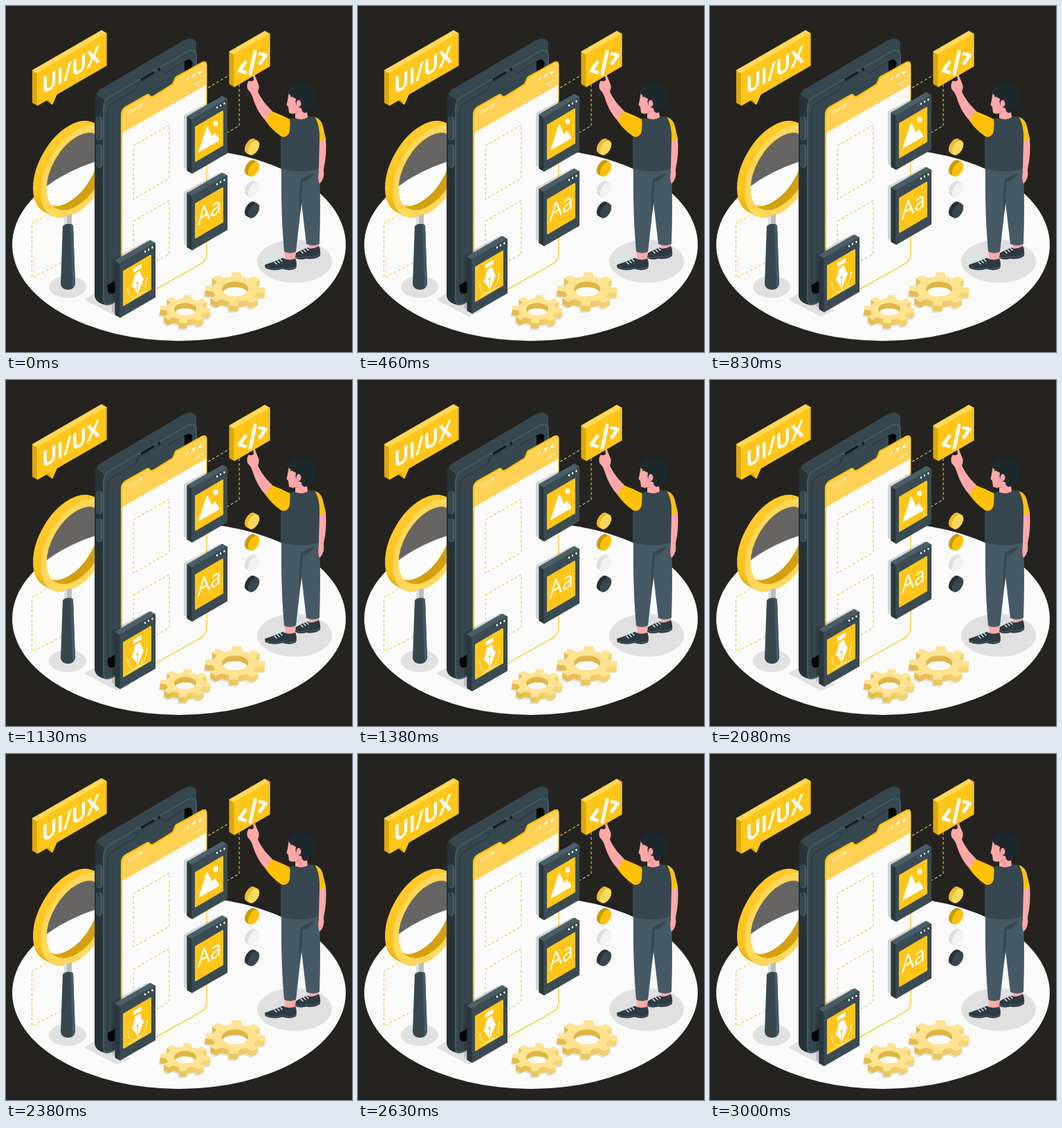
Animation of 500 by 500 pixels, one loop 3040 ms. Source, as an HTML page:

```html
<!DOCTYPE html>
<html lang="en">
<head>
<meta charset="utf-8">
<title>UI/UX design</title>
<style>
html, body { margin: 0; width: 100%; height: 100%; overflow: hidden; background: #24231f; }
svg { display: block; width: 100%; height: 100%; }
text { font-family: "Open Sans", "Noto Sans", sans-serif; fill: #fff; }
.dash { fill: none; stroke: #f3c64f; stroke-width: 1.1; stroke-dasharray: 4 3; }
.white { fill: none; stroke: #fff; stroke-linecap: round; stroke-linejoin: round; }
</style>
</head>
<body>
<svg id="stage" viewBox="0 0 500 500"></svg>
<script>
const SLOPE = 0.577, LOOP = 3040, LIFT = 10;
const YELLOW = ['#ffc619', '#dda70a', '#ffd754'];
const SLATE = ['#3b4b53', '#2a373d', '#4b5f69'];

const path = (d, fill, extra = '') => `<path d="${d}" fill="${fill}" ${extra}/>`;
const poly = (points, fill, extra = '') => `<polygon points="${points}" fill="${fill}" ${extra}/>`;
const ellipse = (x, y, rx, ry, fill, extra = '') =>
  `<ellipse cx="${x}" cy="${y}" rx="${rx}" ry="${ry}" fill="${fill}" ${extra}/>`;
const face = (x, y) => `transform="matrix(.866 -.5 0 1 ${x} ${y})"`;
const isoCircle = (x, y, r, fill, extra = '') => `<circle r="${r}" fill="${fill}" ${extra} ${face(x, y)}/>`;
const label = (x, y, size, weight, text) =>
  `<text font-size="${size}" font-weight="${weight}" ${face(x, y)}>${text}</text>`;

// Upright isometric slab; x, y is the top left corner of its front
function slab(x, y, w, h, [front, side, top]) {
  const rise = w * SLOPE, r = x + w;
  const part = (points, c) => poly(points, c, `stroke="${c}" stroke-width="1.2" stroke-linejoin="round"`);
  return part([x - 7, y - 4, x, y, x, y + h, x - 7, y + h - 4], side) +
    part([x - 7, y - 4, r - 7, y - 4 - rise, r, y - rise, x, y], top) +
    part([x, y, r, y - rise, r, y - rise + h, x, y + h], front);
}

function card(id, dx, dy, icon) {
  const dots = [[305, 147], [310, 144], [315.5, 141]].map(p => ellipse(...p, 1.2, 1.6, '#fff')).join('');
  return `<g id="${id}"><g transform="translate(${dx} ${dy})">` +
    poly('257,158 309,130 320,138 320,206 268,240 257,234', '#000', 'opacity=".15"') +
    slab(269, 164, 50.5, 78, SLATE) + dots +
    poly('274,175.5 313,152.5 313,201.5 274,224.5', '#ffc619', 'stroke="#ffc619" stroke-width="2" stroke-linejoin="round"') +
    `</g>${icon}</g>`;
}

function magnifier() {
  let rim = '';
  for (let d = 11; d >= 0; d--) {
    const color = d ? 'url(#rim)' : '#ffd75a';
    rim += isoCircle(102 - d, 239 - d * 0.55, 55, 'none', `stroke="${color}" stroke-width="10"`);
  }
  return ellipse(89, 406, 27, 16, '#e0e0e0') +
    isoCircle(99, 237, 51, '#fff', 'opacity=".3"') + rim +
    path('M84 304L95 301V318H84Z', '#bdbdbd') + path('M84 304L88 303V318H84Z', '#e0e0e0') +
    path('M82 318Q89 312 97 317L100 402Q97 411 89 410Q80 409 79 402Z', '#37474f') +
    path('M93 315Q96 315 97 317L100 402Q99 406 96 408Z', '#455a64');
}

function phone() {
  const frame = 'M141 148Q141 136 150 131L262 66Q274 60 275 71V360L152 430Q141 435 141 424Z';
  const screen = 'M147 153Q147 145 153 141L181 125L186 122Q189 120 189 116Q190 112 194 110L222 94Q226 92 227 95Q228 99 232 96L260 79Q269 75 269 84V350L157 414Q147 419 147 408Z';
  const button = y => `<rect x="130" y="${y}" width="9.5" height="34" rx="4.5" fill="#455a64"/>
    <rect x="130" y="${y}" width="6.5" height="33" rx="3.2" fill="#37474f"/>`;
  return path('M113 424L129 415L180 440L160 449Z', '#e0e0e0') +
    path('M128 137Q128 126 137 120L256 50Q268 43 275 52V368L152 431Q143 434 134 428Q128 424 128 416Z', '#37474f') +
    path('M128 137Q128 131 131 127L143 137Q141 141 141 148V431Q137 430 134 428Q128 424 128 416Z', '#263238') +
    path(frame, '#37474f', 'stroke="#455a64" stroke-width="2"') +
    path(screen, '#37474f', 'stroke="#263238" stroke-width="1"') +
    path('M147 403L161 395V412L157 414Q147 419 147 408Z', '#050606') +
    path('M258 80L260 79Q269 75 269 84V105H258Z', '#050606') +
    path('M196 106L213 96', 'none', 'stroke="#11181b" stroke-width="3" stroke-linecap="round"') +
    ellipse(221, 91.5, 1.8, 2.2, '#11181b') + button(160) + button(200);
}

function panel() {
  const edge = 'M167 157Q167 150 173 146L203 129Q206 127 207 129L209 131Q211 132 214 130L238 115Q242 113 243 109L244 106Q245 102 249 101L283 82';
  const top = edge + 'Q290 78 290 87';
  const frame = (y, h) => `<path class="dash" d="M184 ${y}L236 ${y - 30}V${y + h - 30}L184 ${y + h}Z"/>`;
  return path(top + 'V358Q290 368 281 373L167 437Z', '#fafafa', 'stroke="#ffc107" stroke-width="1.1"') +
    path(top + 'V113.5L167 184Z', '#ffd154') +
    path('M167 437' + edge.replace('M', 'L') + 'Q287 80 289 82', 'none', 'stroke="#ffc107" stroke-width="2.2"') +
    label(175, 158, 7.5, 400, '11:53') +
    path('M192 145L196 140L195 147L194 144Z', '#fff') +
    path('M259 108L264 103V106ZM269 101L273 97L274 100L270 103ZM278 96L283 93V96L278 99Z', '#fff') +
    [[275, 112.5], [279, 110], [283, 107.7]].map(p => ellipse(...p, 1.1, 1.4, '#fff')).join('') +
    frame(202, 77) + frame(311, 77);
}

function coin(y, front, side) {
  let s = '';
  for (let d = 5; d > 0; d--) s += isoCircle(358 - d, y - d * 0.55, 9.5, side);
  return s + isoCircle(358, y, 9.5, front);
}

function gear(x, y, rx, turn) {
  const ry = rx * 0.56, depth = 8, teeth = 8, hx = rx * 0.44, hy = ry * 0.44, pts = [];
  for (let i = 0; i < teeth; i++)
    for (const [a, r] of [[-0.27, 0.76], [-0.19, 1], [0.19, 1], [0.27, 0.76]]) {
      const t = (i + a) / teeth * 2 * Math.PI + turn;
      pts.push([x + rx * r * Math.cos(t), y + ry * r * Math.sin(t)]);
    }
  const at = (dx, dy) => pts.map(p => [p[0] + dx, p[1] + dy]).join(' ');
  let s = poly(at(-2, depth + 2), '#dedede');
  for (let d = depth; d > 0; d--) s += poly(at(0, d), 'url(#tooth)');
  const half = hx * Math.sqrt(1 - (depth / 2 / hy) ** 2), my = y + depth / 2;
  return s + poly(at(0, 0), '#ffe391') + ellipse(x, y, hx, hy, '#dfb647') +
    path(`M${x - half} ${my}A${hx} ${hy} 0 0 1 ${x + half} ${my}A${hx} ${hy} 0 0 1 ${x - half} ${my}`, '#fafafa');
}

function person() {
  const skin = '#ffa8a7', shoe = '#2d3a41';
  return ellipse(417, 369, 54, 31, '#e0e0e0') +
    path('M437 338H452V352L438 354Z', skin) + path('M402 350H419V368H404Z', skin) +
    path('M419 357Q427 352 436 349Q440 353 452 347Q455 352 454 361Q446 367 434 365Q424 368 418 364Z', shoe) +
    path('M374 374Q386 370 400 364Q408 369 418 365Q421 371 419 379Q411 384 400 380Q386 384 375 379Z', shoe) +
    path('M374 377Q387 382 400 378Q412 382 420 376M418 362Q426 366 434 362Q447 364 454 358', 'none', 'stroke="#455a64" stroke-width="1.2"') +
    '<path class="white" stroke-width="1.2" d="M388 370l3 3M392 368l3 3M396 366l3 3M426 354l3 3M430 352l3 3M434 350l3 3"/>' +
    path('M398 232L453 232Q455 290 453 344Q444 348 434 344L427 284L419 355Q411 359 402 355Q397 300 398 232Z', '#455a64') +
    path('M446 240Q440 252 429 254L427 286L424 304Q423 270 426 250Z', '#37474f') +
    path('M449 192L462 190Q464 215 459 236Q461 250 453 257Q450 250 452 240Z', skin) +
    path('M443 160Q455 161 458 174L462 191Q456 197 450 195Z', '#ffc107') +
    path('M349 120Q347 112 351 108Q355 110 358 107L357 101Q358 98 360 101L364 111Q367 116 364 124Q371 139 385 152L376 167Q363 153 357 134Q355 126 349 120Z', skin) +
    path('M384 152Q397 157 411 164L410 186Q404 192 397 188Q384 179 375 166Z', '#ffc107') +
    path('M410 163Q428 158 446 160Q454 172 453 196L452 235Q424 243 397 235V189Q405 191 409 184Q412 174 410 163Z', '#37474f') +
    path('M409 124L407 136L405.500 143L408 146L409 154Q413 157 418 155L418 162Q428 166 436 161L434 144L424 122Z', skin) +
    path('M418 155Q421 153 423 150Q422 156 418 158Z', '#f28f8f') +
    path('M409 127Q405 119 412 117Q416 111 423 114Q434 110 442 118Q450 123 446 137Q444 149 434 154Q428 156 427 148L422 146Q417 141 419 134Q412 131 409 127Z', '#1e292e') +
    ellipse(423, 141, 3.4, 5, skin) +
    path('M411 131l4-1.500', 'none', 'stroke="#263238" stroke-width="1.5"');
}

const imageIcon = path('M278 212L290 175Q291 174 292 176L298 189L301 184Q302 183 303 185L309 194Z', '#fff') +
  ellipse(303, 170, 3.3, 4, '#fff');
const textIcon = label(277, 317.5, 33, 500, 'Aa');
const penIcon = path('M184 380L196 373V379L184 386Z', '#fff') +
  path('M186 388L194 383Q195 390 199 395L190 418Q187 408 181.500 405Q185 398 186 388Z', '#fff') +
  path('M190 415V403', 'none', 'stroke="#ffc107" stroke-width="1"') + ellipse(190, 401, 1.5, 2, '#ffc107') +
  '<path class="white" stroke-width=".7" d="M176 428L204 412M176 411Q178 427 190 419Q202 412 204 395"/>' +
  ellipse(176, 410, 1.2, 1.4, '#fff') + ellipse(204, 394, 1.2, 1.4, '#fff');

const stage = document.getElementById('stage');
stage.innerHTML = `<defs>
    <linearGradient id="rim" x2=".3" y2="1"><stop stop-color="#ffcb2e"/><stop offset=".5" stop-color="#ffc31a"/><stop offset="1" stop-color="#d3a00e"/></linearGradient>
    <linearGradient id="tooth"><stop stop-color="#e3b84a"/><stop offset="1" stop-color="#f7d777"/></linearGradient>
  </defs>` +
  ellipse(250, 345, 241, 139, '#fafafa') +
  '<path class="dash" d="M80 371L37.500 393V314L66 298M292 118L326 98M337 113V173L316 185"/>' +
  slab(45.5, 97, 99.5, 46.5, YELLOW) + path('M58 136L67 143L75 125Z', YELLOW[0]) + path('M58 136L67 143L62 134Z', YELLOW[1]) +
  label(52, 128, 33, 700, 'UI/UX') +
  magnifier() + phone() + panel() +
  gear(331, 409, 43.5, 0.05) + gear(259, 438, 36.5, 0.1) +
  card('photo', 0, 0, imageIcon) + card('type', 0, 111, textIcon) + card('pen', -104, 208.5, penIcon) +
  coin(205, '#ffd95e', '#f0bb30') + coin(236, '#ffc107', '#cc9a06') +
  coin(266, '#f2f2f2', '#dedede') + coin(296, '#37474f', '#263238') +
  slab(330, 70, 51, 46.5, YELLOW) +
  '<path class="white" stroke-width="4.8" d="M346 81L337 93.500L346 96M353 98L360 66M367 69L375.500 71L367 83"/>' +
  person();

const cards = [['photo', LOOP], ['type', LOOP / 2], ['pen', LOOP / 2]]
  .map(([id, period]) => [document.getElementById(id), period]);
const start = performance.now();

function draw() {
  const t = performance.now() - start + 40;
  for (const [el, period] of cards) {
    const p = t % period / period;
    const up = LIFT * (1 - Math.abs(1 - 2 * p));
    el.setAttribute('transform', `translate(0 ${-up})`);
  }
  requestAnimationFrame(draw);
}
draw();
</script>
</body>
</html>
```
